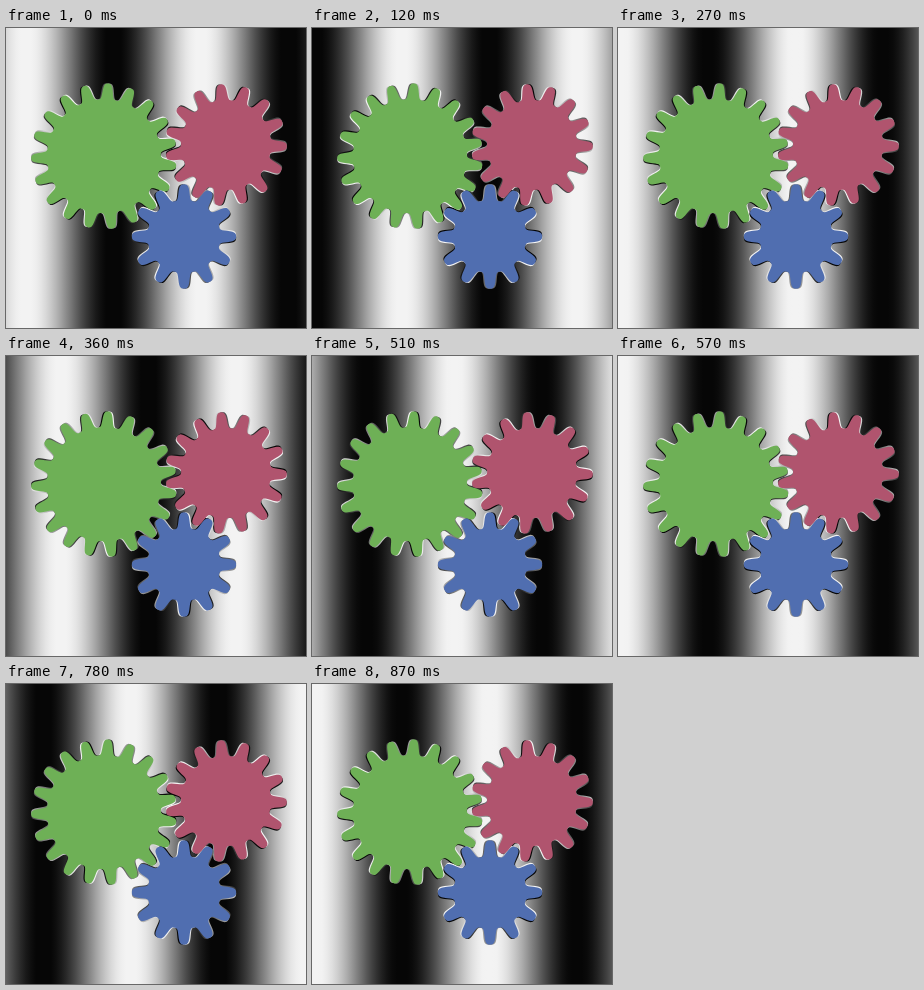
Write an HTML page with a canvas that moves like this. It is 300 by 300 pixels and loops after 0.9 s.

```html
<!DOCTYPE html>
<html lang="en">
<head>
<meta charset="utf-8">
<title>Gears</title>
<style>
html, body { margin: 0; width: 100%; height: 100%; overflow: hidden; }
canvas { display: block; }
</style>
</head>
<body>
<canvas id="stage" width="300" height="300"></canvas>
<script>
const SIZE = 300;
const PERIOD = 175;      // wavelength of the drifting bands, px
const STEP_MS = 30;
const STEPS = 10;        // steps per wavelength
const DARK_START = 107.5;
const RIM = 1.2;         // thickness of the tooth flank lines, px
const TAU = Math.PI * 2;

const ctx = document.getElementById('stage').getContext('2d');

// spin is the direction in which the flank lines make a gear seem to turn
const gears = [
  { x: 98, y: 128.2, tip: 73, root: 57, teeth: 19, angle: 3.2, spin: 1, color: '#6eb056' },
  { x: 220, y: 117, tip: 61, root: 45, teeth: 15, angle: -4.8, spin: 1, color: '#b0546e' },
  { x: 178, y: 208.5, tip: 52.3, root: 36.5, teeth: 12, angle: 0, spin: -1, color: '#506eb0' }
];

function gearPath({ tip, root, teeth, angle }) {
  const path = new Path2D();
  const mid = (tip + root) / 2;
  const depth = (tip - root) / 2;
  const points = teeth * 32;
  const start = angle * Math.PI / 180 - Math.PI / 2;
  for (let i = 0; i < points; i++) {
    const a = i / points * TAU;
    const wave = Math.tanh(1.8 * (Math.cos(teeth * a) - 0.08)) / Math.tanh(1.8);
    const r = mid + depth * wave;
    path.lineTo(r * Math.cos(start + a), r * Math.sin(start + a));
  }
  path.closePath();
  return path;
}

for (const gear of gears) gear.path = gearPath(gear);

function bands(darkX) {
  const gradient = ctx.createLinearGradient(0, 0, SIZE, 0);
  for (let x = 0; x <= SIZE; x += 5) {
    const light = 124 - 122 * Math.cos((x - darkX) / PERIOD * TAU);
    const v = Math.round(Math.min(243, Math.max(6, light)));
    gradient.addColorStop(x / SIZE, `rgb(${v},${v},${v})`);
  }
  return gradient;
}

// The fill stays in stage coordinates while the outline turns.
function fillGear(gear, fill, turn = 0) {
  const placed = new Path2D();
  const matrix = new DOMMatrix()
    .translate(gear.x, gear.y)
    .rotate(turn * 360 / TAU);
  placed.addPath(gear.path, matrix);
  ctx.fillStyle = fill;
  ctx.fill(placed);
}

function draw(step) {
  const darkX = DARK_START + step * PERIOD / STEPS;
  const ahead = bands(darkX + PERIOD / 4);
  const behind = bands(darkX - PERIOD / 4);

  ctx.fillStyle = bands(darkX);
  ctx.fillRect(0, 0, SIZE, SIZE);

  for (const gear of gears) {
    const turn = gear.spin * RIM / ((gear.tip + gear.root) / 2);
    fillGear(gear, behind, -turn);
    fillGear(gear, ahead, turn);
  }
  for (const gear of gears) fillGear(gear, gear.color);
}

const startTime = performance.now();

function tick() {
  const elapsed = performance.now() - startTime;
  draw(Math.floor(elapsed / STEP_MS) % STEPS);
  requestAnimationFrame(tick);
}

tick();
</script>
</body>
</html>
```
